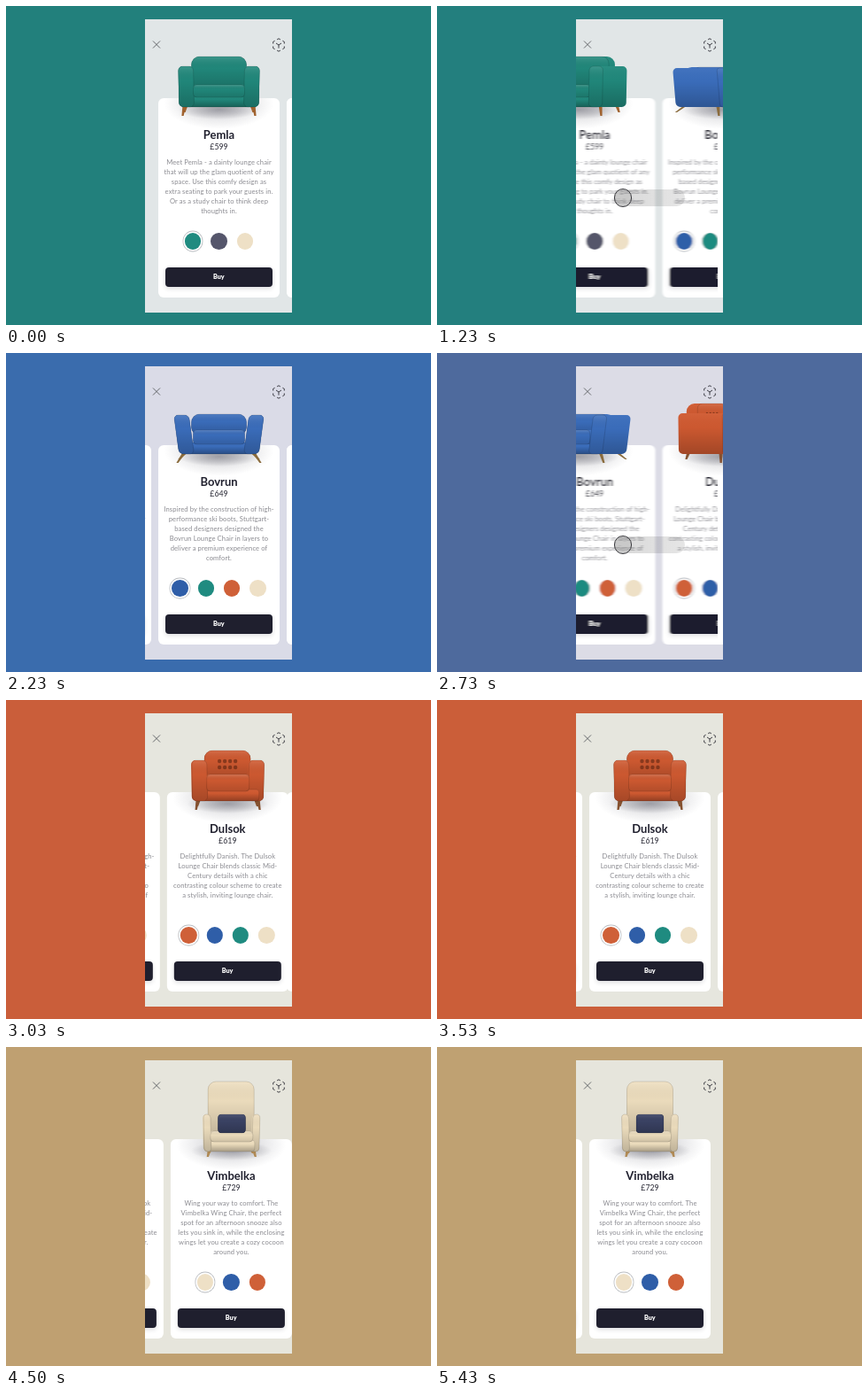
An HTML page with a canvas for the animation above (5460 ms loop, 480 by 360 pixels).

```html
<!DOCTYPE html>
<html lang="en">
<head>
<meta charset="utf-8">
<title>Chair shop</title>
<style>
html, body { margin: 0; width: 100%; height: 100%; overflow: hidden; }
body { position: relative; background: #22807c; font-family: Lato, "Open Sans", sans-serif; }
#phone { position: absolute; left: 157px; top: 14.5px; width: 166px; height: 331.5px; overflow: hidden; }
/* children of .stage use stage coordinates */
.stage { position: absolute; left: -157px; top: -14.5px; width: 480px; height: 360px; }
.layer { position: absolute; left: 0; top: 0; width: 480px; height: 360px; }
.card, #peek { position: absolute; top: 104px; height: 224.5px; background: #fff; border-radius: 6px; }
.card { width: 137px; text-align: center; white-space: nowrap; }
.card > * { position: absolute; left: 0; width: 100%; margin: 0; }
#peek { left: 316.5px; width: 20px; }
h2 { top: 33px; font: 700 13px/16px Lato, "Open Sans", sans-serif; color: #20202e; }
.price { top: 49px; font-size: 8.8px; line-height: 12px; color: #2c2c38; }
.info { top: 67px; font-size: 7.6px; line-height: 11px; letter-spacing: .1px; color: #8b8b91; }
.dots { top: 150px; height: 23px; display: flex; justify-content: center; }
.dots i { width: 18.6px; height: 18.6px; margin: 2.2px 5.4px; border-radius: 50%; background: var(--c); }
.dots i:first-child { box-shadow: 0 0 0 1.6px #fff, 0 0 0 2.4px #b9bcc0; }
.card .buy { left: 7.5px; top: 191.2px; width: 121.5px; height: 22px; border-radius: 4px; background: #1f1f2e;
  box-shadow: 0 2px 5px rgba(31, 31, 46, .15); color: #fff; font-weight: 900; font-size: 7.2px; line-height: 22px; }
#trail { position: absolute; top: 206.5px; height: 19.5px; border-radius: 10px;
  background: linear-gradient(90deg, rgba(60, 60, 60, .2), rgba(60, 60, 60, .13)); }
#finger { position: absolute; top: 206px; width: 18.6px; height: 18.6px; border: 1.2px solid #38383c;
  border-radius: 50%; background: rgba(150, 150, 150, .25); }
</style>
</head>
<body>
<div id="phone"><div class="stage">
  <div id="track" class="layer"></div>
  <div id="peek"></div>
  <canvas id="chairs" class="layer"></canvas>
  <svg class="layer" fill="none">
    <filter id="smear" x="-5%" width="110%"><feGaussianBlur id="blur" stdDeviation="0 0"/></filter>
    <path d="M166 39.5l8 8m0-8l-8 8" stroke="#66696c"/>
    <g stroke="#2c2c34" stroke-width=".9">
      <path d="M308 36.8l6.3 3.6v7.2l-6.3 3.6-6.3-3.6v-7.2z" pathLength="60" stroke-dasharray="6 4" stroke-dashoffset="3"/>
      <path d="M305 42l3 2 3-2M308 44v3.6"/>
    </g>
  </svg>
  <div id="touch"><div id="trail"></div><div id="finger"></div></div>
</div></div>
<script>
const LOOP = 5460, CYCLE = 1500, STEP = 145, MID = 240.5;
const TEAL = '#1f8b80', BLUE = '#2f5ea8', ORANGE = '#cf6038', CREAM = '#eee0c6', SLATE = '#55566b';

// half: half width, arm: arm width, deep: half depth; top, armTop, seat and base are heights on the stage
const sofa = { half: 45, arm: 17, top: 57, armTop: 68, seat: 89, base: 114, deep: 32, flare: 1, kick: 2 };
const items = [
  { name: 'Pemla', price: '£599', dots: [TEAL, SLATE, CREAM], page: '#22807c', phone: '#e1e6e7',
    info: ['Meet Pemla - a dainty lounge chair', 'that will up the glam quotient of any', 'space. Use this comfy design as',
      'extra seating to park your guests in.', 'Or as a study chair to think deep', 'thoughts in.'],
    chair: { ...sofa, color: '#21897c', leg: '#a0622f' } },
  { name: 'Bovrun', price: '£649', dots: [BLUE, TEAL, ORANGE, CREAM], page: '#3a6cad', phone: '#dadbe7',
    info: ['Inspired by the construction of high-', 'performance ski boots, Stuttgart-', 'based designers designed the',
      'Bovrun Lounge Chair in layers to', 'deliver a premium experience of', 'comfort.'],
    chair: { ...sofa, top: 69, armTop: 70, seat: 87, flare: 6, kick: 8, color: '#3b6ebd', leg: '#8a6b3c' } },
  { name: 'Dulsok', price: '£619', dots: [ORANGE, BLUE, TEAL, CREAM], page: '#cb5e39', phone: '#e6e6de',
    info: ['Delightfully Danish. The Dulsok', 'Lounge Chair blends classic Mid-', 'Century details with a chic',
      'contrasting colour scheme to create', 'a stylish, inviting lounge chair.'],
    chair: { ...sofa, half: 40, seat: 84, holes: true, color: '#d05a31', leg: '#85512f' } },
  { name: 'Vimbelka', price: '£729', dots: [CREAM, BLUE, ORANGE], page: '#bfa172', phone: '#e6e5dc',
    info: ['Wing your way to comfort. The', 'Vimbelka Wing Chair, the perfect', 'spot for an afternoon snooze also',
      'lets you sink in, while the enclosing', 'wings let you create a cozy cocoon', 'around you.'],
    chair: { ...sofa, half: 31, arm: 8, top: 39, armTop: 76, seat: 95, base: 118, deep: 18,
      pillow: '#3b4365', color: '#efdfbf', leg: '#b08a55' } }
];

const $ = id => document.getElementById(id);
const clamp = (v, lo = 0, hi = 1) => Math.max(lo, Math.min(hi, v));
const canvas = $('chairs'), ctx = canvas.getContext('2d');
const scale = Math.max(1, window.devicePixelRatio || 1);
canvas.width = 480 * scale;
canvas.height = 360 * scale;

$('track').innerHTML = items.map((it, i) => `<div class="card" style="left:${172 + i * STEP}px">
  <h2>${it.name}</h2><p class="price">${it.price}</p><p class="info">${it.info.join('<br>')}</p>
  <div class="dots">${it.dots.map(c => `<i style="--c:${c}"></i>`).join('')}</div><div class="buy">Buy</div></div>`).join('');

// every chair is a set of rounded blocks: x from x0 to x1, y from y0 to y1, z from back to front
function build({ half, arm, top, armTop, seat, base, deep, flare, pillow, color }) {
  const inner = half - arm;
  const block = (w, y0, y1, r, back, front, more) =>
    ({ x0: -w, x1: w, y0, y1, r, back: back * deep, front: front * deep, lean: 0, light: 0, color, ...more });
  const side = (x0, x1, lean) => block(0, armTop, base, 5, -1, 1, { x0, x1, lean });
  const parts = [
    block(inner + 3, top, seat + 6, 9, -1, -.5),
    block(half - 5, base - 13, base, 3, -.9, .9, { light: -.1 }),
    block(inner + 1, seat, base - 11, 4, -.6, .95, { light: .06 }),
    side(-half, -inner, -flare), side(inner, half, flare)
  ];
  if (pillow) parts.push(block(half / 2, armTop, seat + 2, 4, 1.1, 1.3, { color: pillow }));
  return parts;
}
items.forEach(it => it.parts = build(it.chair));

function slab(x, y, w, h, r, color, light, dark) {
  ctx.beginPath();
  ctx.roundRect(x, y, w, h, Math.min(r, w / 2));
  ctx.fillStyle = color;
  ctx.fill();
  const g = ctx.createLinearGradient(0, y, 0, y + h);
  g.addColorStop(0, `rgba(255,255,255,${light})`);
  g.addColorStop(.35, 'rgba(0,0,0,.02)');
  g.addColorStop(1, `rgba(0,0,0,${dark})`);
  ctx.fillStyle = g;
  ctx.fill();
}

function drawPart(p, c, s) {
  const h = p.y1 - p.y0, w = (p.x1 - p.x0) * c, shear = p.lean * c / h;
  const front = p.x0 * c + p.front * s, back = p.x0 * c + p.back * s;
  ctx.save();
  ctx.transform(1, 0, -shear, 1, shear * p.y1, 0);
  slab(Math.min(front, back), p.y0, Math.abs(front - back) + w, h, p.r, p.color, .04, .22);
  slab(front, p.y0, w, h, p.r * Math.max(c, .4), p.color, .12 + p.light, .2 - p.light);
  ctx.lineWidth = .6;
  ctx.strokeStyle = 'rgba(0,0,0,.22)';
  ctx.stroke();
  ctx.restore();
}

function drawHoles(c, s) {
  ctx.fillStyle = 'rgba(70,25,10,.5)';
  for (let i = 0; i < 8; i++) {
    ctx.beginPath();
    ctx.ellipse((i % 4 * 6 - 9) * c - 16 * s, 69 + (i >> 2) * 7, 2.2 * c, 2.3, 0, 0, 7);
    ctx.fill();
  }
}

function drawLegs({ half, base, deep, kick, leg }, c, s) {
  ctx.fillStyle = leg;
  for (const z of [-1, 1]) for (const side of [-1, 1]) {
    const x = side * (half - 7 + z) * c + z * deep * .75 * s, end = x + kick * (side * c + z * s);
    const foot = 122 + z * 2;
    ctx.beginPath();
    ctx.moveTo(x - 2, base - 2);
    ctx.lineTo(x + 2, base - 2);
    ctx.lineTo(end + 1.1, foot);
    ctx.lineTo(end - 1.1, foot);
    ctx.fill();
  }
}

// soft ellipse that falls on the card only
function drawShadow(rx, ry, y, alpha) {
  ctx.save();
  ctx.translate(0, y);
  ctx.scale(rx, ry);
  const g = ctx.createRadialGradient(0, 0, 0, 0, 0, 1);
  g.addColorStop(0, `rgba(50,50,65,${alpha})`);
  g.addColorStop(.55, `rgba(50,50,65,${alpha * .5})`);
  g.addColorStop(1, 'rgba(50,50,65,0)');
  ctx.fillStyle = g;
  const top = Math.max(-1, (104 - y) / ry);
  ctx.fillRect(-1, top, 2, 1 - top);
  ctx.restore();
}

// chairs turn into place from the right and drift off turning to the left
function drawChair(it, d) {
  const turn = d < 0 ? d * .4 : d * d * .0075;
  const a = clamp(turn, -88, 88) * Math.PI / 180, c = Math.cos(a), s = Math.sin(a);
  ctx.save();
  ctx.translate(MID + d + Math.min(0, d * .3), 0);
  drawShadow(62, 29, 110, .24);
  drawShadow(46, 11, 117, .35);
  ctx.globalAlpha = clamp((110 - Math.abs(d)) / 20);
  drawLegs(it.chair, c, s);
  const depth = p => (p.back + p.front) / 2 * c - (p.x0 + p.x1) / 2 * s;
  for (const p of [...it.parts].sort((p, q) => depth(p) - depth(q))) {
    drawPart(p, c, s);
    if (it.chair.holes && p === it.parts[0]) drawHoles(c, s);
  }
  ctx.restore();
}

// scroll position in cards
function scroll(t) {
  let pos = 0;
  for (let i = 0; i < 3; i++) pos += 1 - (1 - clamp((t - 1082 - CYCLE * i) / 607)) ** 2;
  return pos;
}

function tint(key, t) {
  const rgb = hex => [1, 3, 5].map(i => parseInt(hex.slice(i, i + 2), 16));
  const mixed = items.map(it => rgb(it[key])).reduce((from, to, i) => {
    const k = Math.sin(clamp((t - 1222 - 1478 * (i - 1)) / 360) * Math.PI / 2);
    return from.map((v, j) => v + (to[j] - v) * k);
  });
  return `rgb(${mixed.map(Math.round)})`;
}

function drawTouch(t) {
  const u = t - CYCLE * Math.min(2, Math.floor(t / CYCLE));
  const x = 270 - 60 * (1 - (1 - clamp((u - 1040) / 200)) ** 3);
  $('touch').style.opacity = clamp((u - 960) / 80) * clamp((1440 - u) / 120);
  $('finger').style.left = x - 10.5 + 'px';
  $('trail').style.left = x - 10 + 'px';
  $('trail').style.width = 290 - x + 'px';
}

function frame(now) {
  const t = now % LOOP, pos = scroll(t), speed = (scroll(t + 1) - pos) * STEP;
  const smear = Math.max(0, speed - .15) * 4;
  document.body.style.background = tint('page', t);
  $('phone').style.background = tint('phone', t);
  $('track').style.transform = `translateX(${-pos * STEP}px)`;
  $('track').style.filter = smear ? 'url(#smear)' : 'none';
  $('blur').setAttribute('stdDeviation', smear.toFixed(2) + ' 0');
  $('peek').style.display = t < 3400 ? 'block' : 'none';
  ctx.setTransform(scale, 0, 0, scale, 0, 0);
  ctx.clearRect(0, 0, 480, 360);
  items.forEach((it, i) => {
    const d = (i - pos) * STEP;
    if (Math.abs(d) < STEP) drawChair(it, d);
  });
  drawTouch(t);
  requestAnimationFrame(() => frame(performance.now() - start));
}
const start = performance.now();
frame(0);
</script>
</body>
</html>
```
